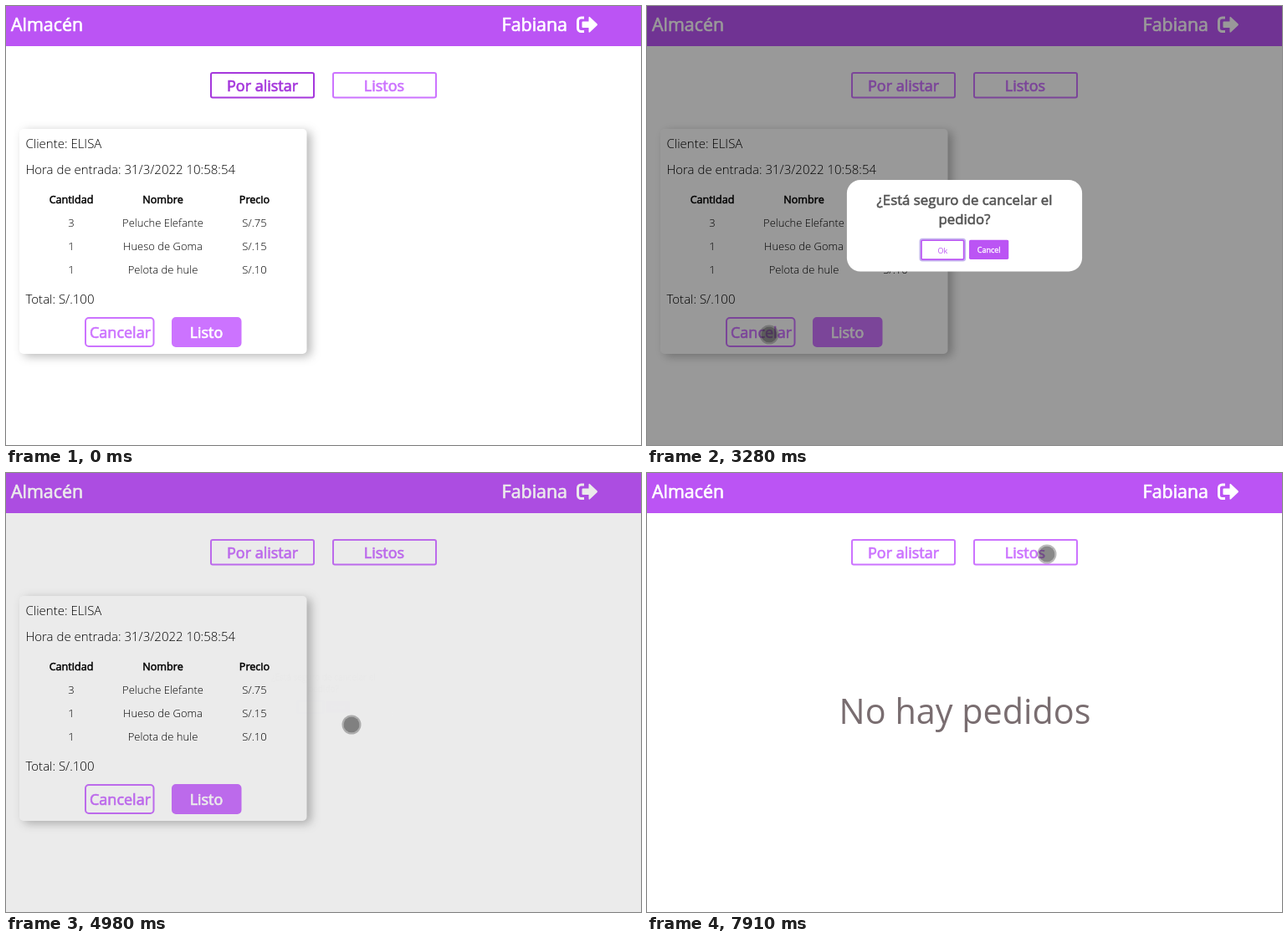
Animation, 759 px wide and 525 px high, one loop 8 s. Source, as an HTML page:

```html
<!DOCTYPE html>
<html lang="es">
<head>
<meta charset="utf-8">
<title>Almacén</title>
<style>
  html, body { margin: 0; width: 100%; height: 100%; overflow: hidden; background: #fff; }
  svg { display: block; width: 759px; height: 525px; font-family: "Open Sans", sans-serif; }
  .strong { stroke: currentColor; fill: currentColor; stroke-width: .7px; }
  .mid { text-anchor: middle; }
  .title { font-size: 21.4px; color: #fff; }
  .btn { font-size: 18px; color: #cc73ff; }
  .btn rect { fill: none; stroke: currentColor; stroke-width: 2; }
  .btn.full rect { fill: currentColor; }
  .btn.full text { color: #fff; }
  .btn.active { color: #a537dc; }
  .info { font-size: 15px; font-weight: 300; }
  .table { font-size: 13px; font-weight: 300; }
  .head { font-size: 12.6px; font-weight: 400; color: #000; stroke-width: .5px; }
  .card { fill: #fff; filter: drop-shadow(5px 3px 6px rgba(0, 0, 0, .28)); }
  .empty { font-size: 41.3px; fill: #796d70; }
  .ask { font-size: 19.9px; color: #545454; }
  .small { font-size: 10.7px; }
</style>
</head>
<body>
<svg viewBox="0 0 759 525">
  <rect width="759" height="525" fill="#fff"/>
  <rect width="759" height="48" fill="#bb54f4"/>
  <text class="title strong" x="6" y="30">Almacén</text>
  <text class="title strong" x="671" y="30" text-anchor="end">Fabiana</text>
  <path d="M691 14h-3.500a4 4 0 0 0-4 4v8.500a4 4 0 0 0 4 4h3.500" fill="none" stroke="#fff" stroke-width="3"/>
  <path d="M689.500 18.500h7v-4.500q0-2 1.500-.8l8.500 8q1 1 0 2l-8.500 8q-1.500 1.200-1.500-.8v-4.500h-7q-1 0-1-1v-5.400q0-1 1-1z" fill="#fff"/>

  <g class="btn" id="todo">
    <rect x="245" y="80" width="123" height="29.500" rx="2"/>
    <text class="strong mid" x="306.500" y="102">Por alistar</text>
  </g>
  <g class="btn">
    <rect x="391" y="80" width="123" height="29.500" rx="2"/>
    <text class="strong mid" x="452" y="102">Listos</text>
  </g>

  <g id="order">
    <rect class="card" x="16" y="147" width="343.500" height="269" rx="5"/>
    <g class="info">
      <text x="23.500" y="170">Cliente: ELISA</text>
      <text x="23.500" y="201">Hora de entrada: 31/3/2022 10:58:54</text>
      <text x="23.500" y="356">Total: S/.100</text>
    </g>
    <g class="table mid" id="table"></g>
    <g class="btn">
      <rect x="95" y="373" width="81.500" height="34" rx="4"/>
      <text class="strong mid" x="136.500" y="397">Cancelar</text>
    </g>
    <g class="btn full">
      <rect x="199" y="373" width="81.500" height="34" rx="4"/>
      <text class="strong mid" x="239.500" y="397">Listo</text>
    </g>
  </g>
  <text class="empty mid" id="empty" x="380" y="300">No hay pedidos</text>

  <rect id="shade" width="759" height="525"/>
  <g id="popup">
    <rect x="213" y="198" width="333" height="129.500" rx="19" fill="#fff"/>
    <g class="ask mid">
      <text class="strong" x="379.500" y="234">¿Está seguro de cancelar el</text>
      <text class="strong" x="379.500" y="261">pedido?</text>
    </g>
    <g class="small mid">
      <rect x="317" y="282" width="63" height="30" rx="3" fill="#fff" stroke="#c5b5ee" stroke-width="3"/>
      <rect x="318.500" y="283.500" width="60" height="27" rx="1.500" fill="#fff" stroke="#bb54f4" stroke-width="2"/>
      <text x="348.500" y="302" fill="#bb54f4">Ok</text>
      <rect x="386" y="283" width="56" height="27.500" rx="2" fill="#bb54f4"/>
      <text class="strong" x="414" y="301" style="color:#fff;stroke-width:.4px">Cancel</text>
    </g>
  </g>

  <g id="pointer">
    <circle r="9.500" fill="#282828" fill-opacity=".55" id="dot"/>
    <circle r="10.500" fill="none" stroke="#3c3c3c" stroke-opacity=".36" stroke-width="2"/>
  </g>
</svg>
<script>
const LOOP = 8000;
const $ = id => document.getElementById(id);
const show = (id, on) => $(id).setAttribute('visibility', on ? 'visible' : 'hidden');

const rows = [
  ['Cantidad', 'Nombre', 'Precio'],
  ['3', 'Peluche Elefante', 'S/.75'],
  ['1', 'Hueso de Goma', 'S/.15'],
  ['1', 'Pelota de hule', 'S/.10']
];
$('table').innerHTML = rows.map((row, r) => row.map((cell, c) =>
  `<text class="${r ? '' : 'head strong'}" x="${[78, 187.5, 297][c]}" y="${236 + 28 * r}">${cell}</text>`
).join('')).join('');

// Pointer strokes: first step, last step, step count, points evenly spaced in time.
const moves = [
  [120, 880, 12, [[714, 514], [698, 462], [674, 403], [638, 364], [589, 342]]],
  [950, 1690, 12, [[585, 342], [478, 330], [260, 314], [138, 352], [145, 390]]],
  [1950, 2080, 2, [[145, 392], [146, 393]]],
  [3830, 4520, 11, [[178, 350], [346, 264], [385, 274], [402, 288], [411, 298], [413, 301]]],
  [5260, 5890, 9, [[411, 303], [390, 320], [322, 355], [201, 390], [221, 384.5]]],
  [7290, 7640, 6, [[225, 380], [252, 342], [330, 230], [400, 140], [452, 97], [473, 80]]],
  [7830, 7910, 2, [[475, 88], [478, 97]]]
];
const presses = [[2880, 2960], [4720, 4860], [6160, 6250]];

const clamp = (v, lo = 0, hi = 1) => Math.min(hi, Math.max(lo, v));
const lerp = (a, b, u) => a + (b - a) * u;
const snap = (t, start, step) => start + Math.floor((t - start) / step + .01) * step;

// CSS "ease": cubic-bezier(.25, .1, .25, 1)
function ease(x) {
  let lo = 0, hi = 1;
  const bez = (s, a, b) => 3 * s * (1 - s) * ((1 - s) * a + s * b) + s ** 3;
  for (let i = 0; i < 20; i++) {
    const m = (lo + hi) / 2;
    if (bez(m, .25, .25) < x) lo = m; else hi = m;
  }
  return bez(lo, .1, 1);
}

// Catmull-Rom curve through the points, u in 0..1
function curve(pts, u) {
  const last = pts.length - 1;
  const i = Math.min(Math.floor(u * last), last - 1);
  const f = u * last - i;
  const at = n => pts[clamp(n, 0, last)];
  return [0, 1].map(d => {
    const [a, b, c, e] = [i - 1, i, i + 1, i + 2].map(n => at(n)[d]);
    return b + f / 2 * (c - a + f * (2 * a - 5 * b + 4 * c - e + f * (3 * (b - c) + e - a)));
  });
}

function drawPointer(t) {
  const move = moves.filter(m => t >= m[0]).pop();
  show('pointer', move);
  if (!move) return;
  const [start, end, count, pts] = move;
  const time = snap(t, start, (end - start) / (count - 1));
  const [x, y] = curve(pts, clamp((time - start) / (end - start)));
  $('pointer').setAttribute('transform', `translate(${x} ${y})`);
  const down = presses.some(([a, b]) => t >= a && t < b);
  $('dot').setAttribute('fill-opacity', down ? .68 : .55);
}

const bounce = [[0, .7], [135, 1.05], [240, .95], [300, 1]];
function bounceScale(ms) {
  const i = bounce.findIndex(k => ms < k[0]);
  if (i < 0) return 1;
  if (!i) return .7;
  const [[t0, a], [t1, b]] = [bounce[i - 1], bounce[i]];
  return lerp(a, b, ease((ms - t0) / (t1 - t0)));
}

function drawPopup(t) {
  const open = t >= 3210 && t < 5043;
  show('popup', open);
  show('shade', open);
  if (!open) return;
  let scale, alpha = 1, dark;
  if (t < 4860) {
    const time = snap(t, 3210, 70);
    scale = bounceScale(time - 3246);
    dark = time < 3280 ? .12 : .4;
  } else {
    const time = snap(t, 4860, 60);
    const u = ease(clamp((time - 4840) / 153));
    scale = lerp(1, .5, u);
    alpha = 1 - u;
    dark = .4 * clamp((5011 - time) / 160);
  }
  $('popup').setAttribute('transform', `translate(379.5 262.6) scale(${scale}) translate(-379.5 -262.6)`);
  $('popup').setAttribute('opacity', alpha);
  $('shade').setAttribute('opacity', dark);
}

function draw(now) {
  const t = now % LOOP;
  $('todo').classList.toggle('active', t < 3210);
  show('order', t < 6340);
  show('empty', t >= 6340);
  drawPopup(t);
  drawPointer(t);
}

let origin;
function tick(now) {
  origin ??= now;
  draw(now - origin);
  requestAnimationFrame(tick);
}
draw(0);
requestAnimationFrame(tick);
</script>
</body>
</html>
```
